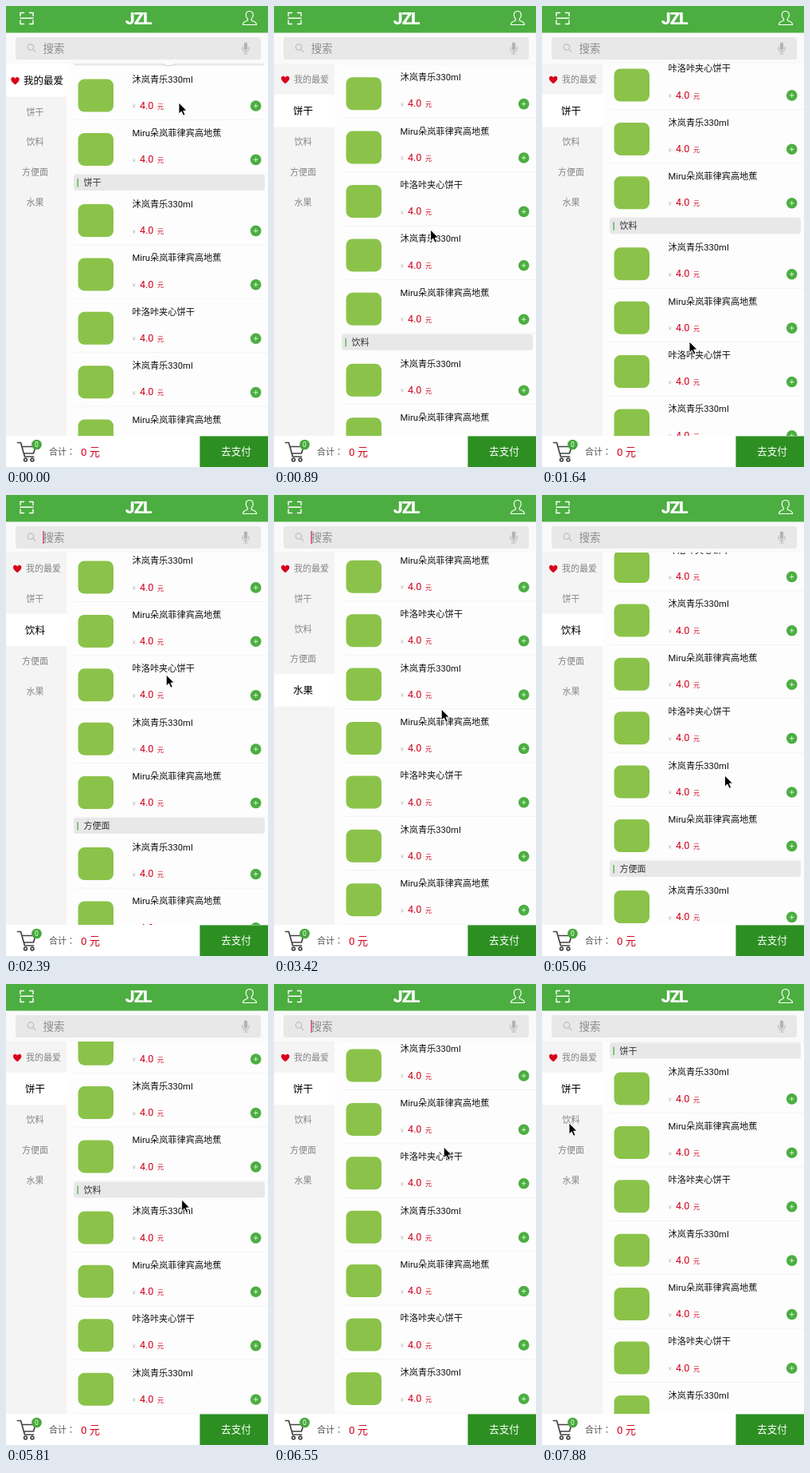
An HTML page that plays this animation: 329 px wide and 577 px high, repeating every 8 s.

```html
<!DOCTYPE html>
<html lang="zh-CN">
<head>
<meta charset="utf-8">
<title>Shop</title>
<style>
html, body { margin: 0; width: 100%; height: 100%; overflow: hidden; background: #fdfdfd; }
svg { display: block; width: 100vw; height: 100vh; }
text { font-family: Roboto, "Noto Sans CJK SC", "Noto Sans CJK", sans-serif; }
.total { font-family: "Noto Sans CJK TC", "Noto Sans CJK", sans-serif; }
.line { fill: none; stroke-linecap: round; stroke-linejoin: round; }
</style>
</head>
<body>
<svg viewBox="0 0 329 577">
  <defs>
    <clipPath id="listArea"><rect x="76" y="72" width="253" height="466"/></clipPath>
  </defs>
  <rect width="329" height="577" fill="#fdfdfd"/>
  <g clip-path="url(#listArea)">
    <g id="list"></g>
    <circle id="spinner" cx="204.5" cy="60" r="15" fill="#fafafa" stroke="#ccc"/>
  </g>

  <rect y="72" width="76" height="466" fill="#f4f4f4"/>
  <g id="sidebar"></g>

  <rect y="33" width="329" height="39" fill="#fafafa"/>
  <rect x="12" y="39" width="308" height="28" rx="3" fill="#e8e8e8"/>
  <g class="line" stroke="#bdbdbd" stroke-width="1.2">
    <circle cx="31" cy="51.5" r="3.7"/>
    <path d="M33.8 54.3l3 3"/>
    <path d="M296.8 51.5v1.5a4.2 4.2 0 0 0 8.4 0v-1.5M301 57.5v2.5M298.5 60h5"/>
  </g>
  <rect x="298.8" y="45.5" width="4.4" height="10" rx="2.2" fill="#b4b4b4"/>
  <text x="46.5" y="57.6" font-size="13.5" fill="#8c8c8c">搜索</text>
  <rect id="caret" x="46.3" y="45" width="1.4" height="16" fill="#d0396b"/>

  <rect width="329" height="33.5" fill="#4cae41"/>
  <g class="line" stroke="#fff" stroke-width="1.4">
    <path d="M18 12.5v-4h4.5M29.5 8.5h4.5v4M18 18v4.5h4.5M29.5 22.5h4.5v-4.5M18 15.3h16"/>
    <path stroke-width="1.2" d="M297.5 23.5c0-4 3-4 5.5-5.3c.8-.5.7-1.3.2-2c-3.4-4.2-2.2-9.7 2.6-9.7s6 5.5 2.6 9.7c-.5.7-.6 1.5.2 2c2.5 1.3 5.9 1.3 5.9 5.3z"/>
  </g>
  <text x="166" y="22.8" font-size="21" font-weight="900" letter-spacing="-1.2" text-anchor="middle" fill="#fff">JZL</text>

  <rect y="538" width="329" height="39" fill="#fff"/>
  <g class="line" stroke="#444" stroke-width="1.7">
    <path d="M14.5 546.5h4l5 17.5h11M20.3 551.5h16.7l-2.5 8.5h-11.5"/>
    <circle cx="24.5" cy="568" r="1.9"/><circle cx="33" cy="568" r="1.9"/>
  </g>
  <circle cx="38.5" cy="549" r="6.3" fill="#43a838"/>
  <text x="38.5" y="552" font-size="8.5" text-anchor="middle" fill="#fff">0</text>
  <text class="total" x="54" y="562" font-size="11" fill="#555" lang="zh-TW">合计：</text>
  <text x="94" y="562.8" font-size="13.2" fill="#d0021b">0 元</text>
  <rect x="243.4" y="538.4" width="85.6" height="38.6" fill="#2d8f22"/>
  <text x="289" y="562.2" font-size="12.7" text-anchor="middle" fill="#fff">去支付</text>

  <path id="pointer" d="M0 0v14l3.3-3 2.3 5.2 2.4-1-2.3-5.1h4.3z" fill="#000" stroke="#fff" stroke-width=".9"/>
</svg>
<script>
const LOOP = 8000, STEPS = 54;
const ROW = 67.4, BAR = 21.6, STICK = 84;
const GREEN = '#4cae41', RED = '#d0021b';
const categories = [['我的最爱', 2], ['饼干', 8], ['饮料', 8], ['方便面', 8], ['水果', 8]];
const products = ['沐岚青乐330ml', 'Miru朵岚菲律宾高地蕉', '咔洛咔夹心饼干'];

// step, y of the second section bar, pointer x, pointer y
const track = [
  [0, 221, 217, 121], [4, -60, 205, 160], [8, -220, 188, 400], [11, -285.5, 185, 420],
  [15, -560, 200, 190], [19, -1150, 205, 330], [23, -1695, 210.2, 268], [26, -1660, 235, 230],
  [30, -1118, 261, 205], [31, -1010, 258, 240], [34, -653.6, 229.5, 351], [38, -380, 222, 250],
  [41, -150, 218, 310], [44, 54.5, 213.2, 204], [46, 200, 218, 320], [47, 240, 200, 300],
  [49, 240, 38, 135], [50, 83.5, 37, 131], [53, 83.5, 34, 174]
];

const byId = id => document.getElementById(id);

function add(parent, tag, attrs, content) {
  const node = document.createElementNS('http://www.w3.org/2000/svg', tag);
  set(node, attrs);
  if (content) node.textContent = content;
  return parent.appendChild(node);
}

function set(node, attrs) {
  for (const key in attrs) node.setAttribute(key, attrs[key]);
}

function label(parent, x, middle, size, fill, content) {
  return add(parent, 'text', { x, y: middle + size * 0.38, 'font-size': size, fill }, content);
}

function addRow(list, y, name) {
  add(list, 'rect', { x: 90.5, y, width: 44.5, height: 41, rx: 8, fill: '#8bc34a' });
  label(list, 158.5, y - 0.3, 11.2, '#111', name);
  label(list, 159, y + 34, 7, '#bbb', '¥');
  label(list, 168, y + 32.4, 12.5, RED, '4.0');
  label(list, 190, y + 34, 8, RED, '元');
  add(list, 'circle', { cx: 313.7, cy: y + 33.4, r: 6.8, fill: GREEN });
  add(list, 'path', { d: `M311 ${y + 33.4}h5.4m-2.7-2.7v5.4`, stroke: '#e4f3e2', 'stroke-width': 0.9 });
  add(list, 'rect', { x: 85, y: y + 50.5, width: 244, height: 1, fill: '#f3f3f3' });
}

function addBar(list, y, name) {
  add(list, 'rect', { x: 85, y: y - 10, width: 240, height: 20, rx: 3, fill: '#e8e8e8' });
  add(list, 'rect', { x: 89.5, y: y - 5, width: 1.3, height: 10.5, fill: GREEN });
  label(list, 97.5, y, 11, '#333', name);
}

const barOffsets = [];
let offset = -(BAR + 2 * ROW);
for (const [name, count] of categories) {
  barOffsets.push(offset);
  for (let i = 0; i < count; i++) addRow(byId('list'), offset + 27 + i * ROW, products[i % 3]);
  addBar(byId('list'), offset, name);
  offset += BAR + count * ROW;
}

const tabs = categories.map(([name], i) => {
  const back = add(byId('sidebar'), 'rect', { x: 0, width: 76, fill: '#fff' });
  const text = add(byId('sidebar'), 'text', i ? { x: 36.6, 'text-anchor': 'middle' } : {}, name);
  return { back, text };
});
const heart = add(byId('sidebar'), 'path', {
  d: 'M0 4.8C-3.8 2-5.2 0-5.2-1.9C-5.2-5.2-1.3-5.6 0-2.8C1.3-5.6 5.2-5.2 5.2-1.9C5.2 0 3.8 2 0 4.8z', fill: '#d9001b'
});

function showTabs(active) {
  let top = 73;
  tabs.forEach(({ back, text }, i) => {
    const on = i === active, height = on ? 40.5 : 37.8, size = on ? 12.5 : 11;
    const middle = top + height / 2;
    set(back, { y: i ? top : 72, height: i ? height : height + 1, visibility: on ? 'visible' : 'hidden' });
    set(text, { y: middle + size * 0.38, 'font-size': size, fill: on ? '#000' : '#858585' });
    if (!i) {
      set(text, { x: on ? 22 : 25 });
      set(heart, { transform: `translate(${on ? 11.5 : 14.2} ${middle + 0.5})` });
    }
    top += height;
  });
}

function sample(step) {
  const next = Math.max(1, track.findIndex(key => key[0] >= step));
  const a = track[next - 1], b = track[next];
  const p = (step - a[0]) / (b[0] - a[0]);
  return a.map((v, i) => v + (b[i] - v) * p);
}

function draw(time) {
  const step = Math.min(STEPS - 1, Math.floor(time / LOOP * STEPS));
  const [, scroll, x, y] = sample(step);
  set(byId('list'), { transform: `translate(0 ${scroll})` });
  set(byId('pointer'), { transform: `translate(${x} ${y})` });
  set(byId('spinner'), { visibility: step ? 'hidden' : 'visible' });
  const blink = time % 1000;
  set(byId('caret'), { visibility: blink >= 100 && blink < 600 ? 'visible' : 'hidden' });
  showTabs(Math.max(0, barOffsets.filter(bar => scroll + bar <= STICK).length - 1));
}

let start;
function tick(now) {
  start ??= now;
  draw((now - start) % LOOP);
  requestAnimationFrame(tick);
}
draw(0);
requestAnimationFrame(tick);
</script>
</body>
</html>
```
